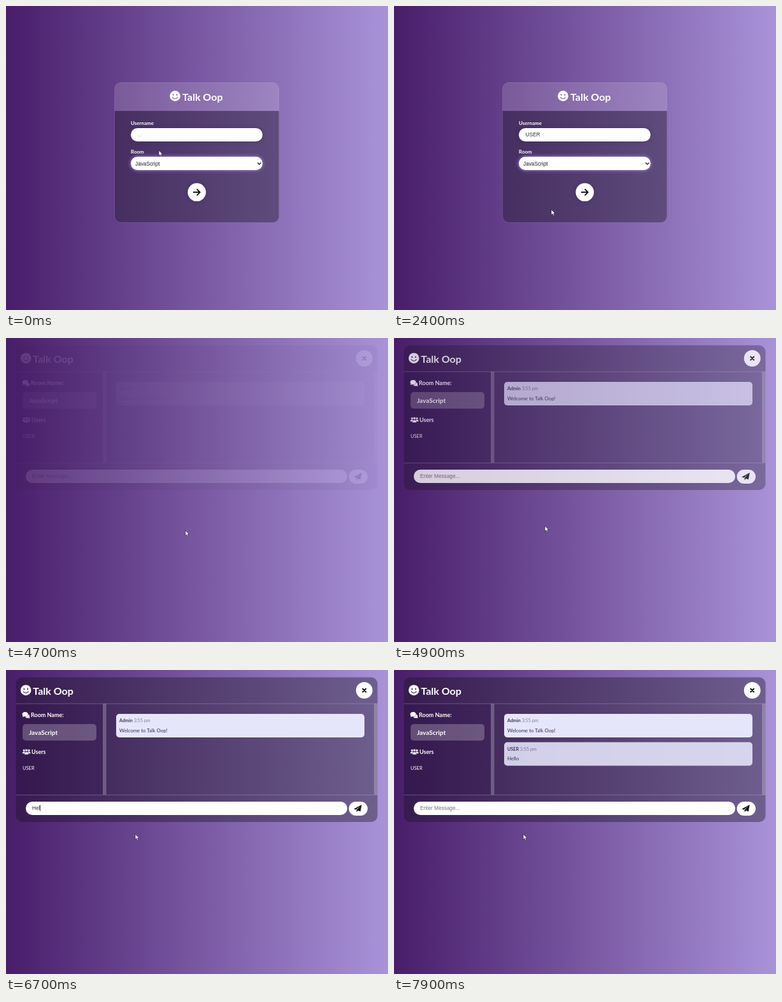
Recreate the animation shown at these times as an HTML page. Size 600x478 px, loop 8 s.

```html
<!DOCTYPE html>
<html lang="en">
<head>
<meta charset="utf-8">
<title>Talk Oop</title>
<style>
  html, body { margin: 0; width: 100%; height: 100%; overflow: hidden; background: #79589f; }
  svg { display: block; width: 100%; height: 100%; }
  text { font-family: Lato, sans-serif; fill: #fff; white-space: pre; }
  .b { font-weight: 700; }
  .title { font-size: 16px; font-weight: 700; }
  .label { font-size: 8px; font-weight: 700; }
  .side { font-size: 9px; font-weight: 700; }
  .field { font-family: "Liberation Sans", Arial, sans-serif; font-size: 8.25px; fill: #333; }
  .meta { font-size: 7.2px; fill: #463a5e; }
  .time { font-size: 7.2px; fill: #837b9b; }
  .msg { font-size: 7.8px; fill: #372c50; }
  .dark { fill: #191423; fill-opacity: .4; }
  .light { fill: #fff; fill-opacity: .23; }
  .shade { fill: #35205a; opacity: .5; filter: url(#blur); }
  .glow { fill: #c9a9ff; opacity: .8; filter: url(#blur); }
  .ink { fill: none; stroke: #111; stroke-linecap: round; stroke-linejoin: round; }
</style>
</head>
<body>
<svg viewBox="0 0 600 478" preserveAspectRatio="none">
  <defs>
    <linearGradient id="bg">
      <stop offset="0" stop-color="#481d69"/>
      <stop offset="1" stop-color="#a993d8"/>
    </linearGradient>
    <filter id="blur" x="-60" y="-60" width="720" height="600" filterUnits="userSpaceOnUse">
      <feGaussianBlur stdDeviation="3.2"/>
    </filter>
    <g id="face">
      <circle r="8.3" fill="#fff"/>
      <circle cx="-2.8" cy="-1.8" r="1.1"/>
      <circle cx="2.8" cy="-1.8" r="1.1"/>
      <path d="M-4 2.2Q0 6.8 4 2.2" fill="none" stroke="currentColor" stroke-width="1.1" stroke-linecap="round"/>
    </g>
    <g id="person"><circle cy="-2.4" r="2"/><path d="M-3.2 4.4V3Q-3.2 .2 0 .2T3.2 3V4.4Z"/></g>
  </defs>
  <rect width="600" height="478" fill="url(#bg)"/>

  <g id="login">
    <path class="light" style="fill-opacity:.14" d="M170.5 165V130a10 10 0 0 1 10-10H419a10 10 0 0 1 10 10V165Z"/>
    <path class="dark" d="M170.5 165V330.500a10 10 0 0 0 10 10H419a10 10 0 0 0 10-10V165Z"/>
    <rect x="170.500" y="120.500" width="258" height="220" rx="10" fill="none" stroke="#b79be0" stroke-opacity=".22"/>
    <use href="#face" x="265.500" y="141.500" fill="#76599f" color="#76599f"/>
    <text class="title" x="277" y="148.500">Talk Oop</text>
    <text class="label" x="196" y="186.500">Username</text>
    <rect class="shade" x="196" y="192" width="207" height="21" rx="10.500"/>
    <rect x="196" y="192" width="207" height="21" rx="10.500" fill="#fff"/>
    <text class="field" id="user" x="206.500" y="205.200"></text>
    <text class="label" x="196" y="232">Room</text>
    <rect class="shade" x="196" y="237" width="207" height="21" rx="10.500"/>
    <rect class="glow" id="roomGlow" x="196" y="237" width="207" height="21" rx="10.500"/>
    <rect x="196" y="237" width="207" height="21" rx="10.500" fill="#fff"/>
    <text class="field" x="203" y="250.600" style="fill:#1c1c28">JavaScript</text>
    <path class="ink" d="M395.600 246.800l2.300 2.300 2.300-2.300" stroke-width="1.300"/>
    <circle class="shade" cx="299.700" cy="292.800" r="14.300"/>
    <circle class="glow" id="goGlow" cx="299.700" cy="292.800" r="14.800"/>
    <circle cx="299.700" cy="292.800" r="14.300" fill="#fff"/>
    <path class="ink" d="M294.600 292.800H304.500M300.200 288.300l4.500 4.500-4.500 4.500" stroke-width="1.900"/>
  </g>

  <g id="chat">
    <rect class="dark" x="15.500" y="11.500" width="568" height="227.500" rx="10"/>
    <rect x="16" y="53" width="136" height="143" fill="#2a0f48" fill-opacity=".18"/>
    <rect class="light" x="152" y="53" width="5.500" height="143"/>
    <rect class="light" x="578" y="53" width="5.500" height="143"/>
    <path d="M15.500 53H583.500M15.500 196.500H583.500" stroke="#cdb9ea" stroke-opacity=".32"/>
    <use href="#face" x="31.200" y="31.700" fill="#3c1f5c" color="#3c1f5c"/>
    <text class="title" x="42.300" y="38.500">Talk Oop</text>
    <circle cx="562.700" cy="32" r="13" fill="#fff"/>
    <path class="ink" d="M560.200 29.500l5 5M565.200 29.500l-5 5" stroke-width="2"/>
    <g fill="#fff">
      <ellipse cx="30" cy="69.600" rx="4.500" ry="3.600"/>
      <path d="M26.800 71l-1 3 3.600-1.200Z"/>
      <path d="M35 69.600Q37.400 70.800 37 73L37.400 76 34.800 75.200Q31.500 76 30 74Q34.500 73.500 35 69.600Z"/>
      <use href="#person" transform="translate(28.300 128) scale(.75)"/>
      <use href="#person" transform="translate(36 128) scale(.75)"/>
      <use href="#person" x="32.100" y="128.600" stroke="#3c1f5c" stroke-width=".5"/>
    </g>
    <text class="side" x="39" y="74.200">Room Name:</text>
    <rect class="light" x="26" y="85" width="116" height="26" rx="5"/>
    <text class="b" x="36" y="102" font-size="10">JavaScript</text>
    <text class="side" x="40" y="132">Users</text>
    <text x="26" y="157" font-size="7.500">USER</text>
    <g id="msgs"></g>
    <rect class="glow" id="inputGlow" x="31" y="207" width="505" height="21" rx="10.500"/>
    <rect x="31" y="207" width="505" height="21" rx="10.500" fill="#fff"/>
    <text class="field" id="draft" x="41" y="220.200"></text>
    <rect id="caret" y="212.300" width=".8" height="9.500" fill="#111"/>
    <rect x="538.500" y="207" width="29.500" height="22" rx="11" fill="#fff"/>
    <path d="M546.300 218.600L558.700 211.700 556.700 222.600 552.800 221 550.600 223.600V220L556.500 214 549.300 219.700Z" fill="#111"/>
  </g>

  <g id="cursor">
    <path id="arrow" d="M0 0V8.600L2 6.800 3.400 9.900 4.900 9.200 3.500 6.200H6.200Z" fill="#fff" stroke="#241738" stroke-width=".7"/>
    <path id="hand" d="M2 .7Q3-.2 3.900.7V4.600Q5 3.900 5.700 4.900 6.700 4.400 7.300 5.300 8.500 5 8.700 6.300V9Q8.600 10.600 7.700 12.300H3.300Q1.900 9.600.1 7.600-.4 6.300 1 6.200L2 7.200Z" fill="#fff" stroke="#111" stroke-width=".8"/>
    <path id="beam" d="M-1.500 0H1.500M0 0V8M-1.500 8H1.500" fill="none" stroke="#1b1228" stroke-width=".9"/>
  </g>
</svg>
<script>
const LOOP = 8000, STEP = 100;
const $ = id => document.getElementById(id);
const clamp = v => Math.max(0, Math.min(1, v));

// time, x, y, pointer shape from that time on
const path = [
  [0, 240, 227, 'arrow'], [200, 240, 227, 'arrow'], [400, 231, 200, 'beam'],
  [600, 234, 196, 'beam'], [1300, 234, 196, 'beam'], [1500, 246, 222, 'arrow'],
  [1800, 261, 245, 'arrow'], [1900, 261, 245, 'arrow'], [2200, 252, 285, 'arrow'],
  [2400, 247, 320, 'arrow'], [2500, 247, 320, 'arrow'], [3400, 268, 318, 'arrow'],
  [3600, 286, 325, 'arrow'], [3800, 299, 304, 'hand'], [4000, 302, 300.5, 'hand'],
  [4300, 304, 306, 'arrow'], [4600, 304, 306, 'arrow'], [4900, 237, 295.5, 'arrow'],
  [5300, 196, 240, 'arrow'], [5500, 184, 221, 'beam'], [5600, 183.5, 227.5, 'beam'],
  [5700, 188, 238, 'arrow'], [6000, 203, 258, 'arrow'], [LOOP, 203, 258, 'arrow']
];
const userText = [[0, '...'], [500, 'U'], [600, 'US'], [700, 'USE'], [900, 'USER']];
const draftText = [[0, ''], [6400, 'H'], [6500, 'He'], [6700, 'Hel'], [6900, 'Hell'], [7000, 'Hello'], [7300, '']];
const carets = [[0, false], [5500, true], [6000, false], [6400, true], [7800, false]];

const at = (table, t) => table.filter(row => row[0] <= t).pop()[1];

// CSS "ease": cubic-bezier(.25, .1, .25, 1)
function ease(p) {
  p = clamp(p);
  let lo = 0, hi = 1;
  for (let i = 0; i < 24; i++) {
    const u = (lo + hi) / 2, v = 1 - u;
    if (.75 * v * u + u ** 3 < p) lo = u; else hi = u;
  }
  const u = (lo + hi) / 2, v = 1 - u;
  return .3 * v * v * u + 3 * v * u * u + u ** 3;
}
const fade = (t, start, length) => ease((t - start) / length);

function bubble(id, y, who, text) {
  return `<g id="${id}" transform="translate(173 ${y})">
    <rect width="390" height="37" rx="5" fill="#e6e6fb"/>
    <text class="meta b" x="5" y="13.300">${who} <tspan class="time" font-weight="400">3:55 pm</tspan></text>
    <text class="msg" x="5" y="28.800">${text}</text></g>`;
}
$('msgs').innerHTML = bubble('welcome', 69, 'Admin', 'Welcome to Talk Oop!') +
  bubble('hello', 113.5, 'USER', 'Hello');

function movePointer(t) {
  const i = Math.max(0, path.findIndex(row => row[0] > t) - 1);
  const [t0, x0, y0, shape] = path[i], [t1, x1, y1] = path[i + 1];
  const p = (t - t0) / (t1 - t0);
  $('cursor').setAttribute('transform', `translate(${x0 + (x1 - x0) * p} ${y0 + (y1 - y0) * p})`);
  for (const id of ['arrow', 'hand', 'beam']) $(id).style.display = id === shape ? '' : 'none';
}

function draw(t) {
  const user = at(userText, t), draft = at(draftText, t);
  $('login').style.display = t < 4300 ? '' : 'none';
  $('user').textContent = user;
  $('user').style.fill = user === '...' ? '#aaa' : '#333';
  $('roomGlow').style.opacity = .8 * (1 - fade(t, 2500, 500));
  $('goGlow').style.opacity = .8 * fade(t, 3600, 400);

  $('chat').style.display = t >= 4700 ? '' : 'none';
  $('chat').style.opacity = fade(t, 4640, 550);
  $('welcome').style.opacity = fade(t, 4600, 550);
  $('hello').style.opacity = fade(t, 7310, 1000);
  $('inputGlow').style.opacity = .85 * fade(t, 5300, 300) * (1 - fade(t, 5600, 400));
  $('draft').textContent = draft || 'Enter Message...';
  $('draft').style.fill = draft ? '#333' : '#757575';
  $('caret').style.display = at(carets, t) ? '' : 'none';
  $('caret').setAttribute('x', 41 + (draft ? $('draft').getComputedTextLength() : 0));
  movePointer(t);
}

const begin = performance.now();
function tick() {
  const t = (performance.now() - begin) % LOOP;
  draw(Math.floor(t / STEP) * STEP);
  requestAnimationFrame(tick);
}
tick();
</script>
</body>
</html>
```
